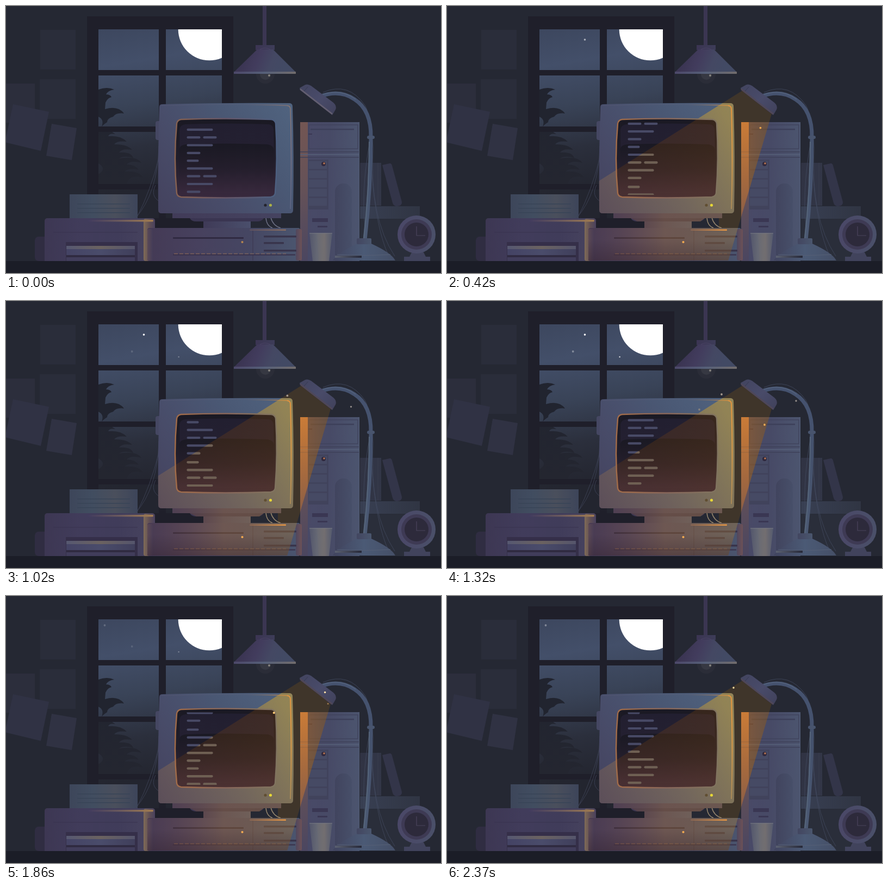
Animation of 800 by 492 pixels, one loop 2.4 s. Source, as an HTML page with a canvas:

```html
<!DOCTYPE html>
<html lang="en">
<head>
<meta charset="utf-8">
<title>Night desk</title>
<style>
html, body { margin: 0; width: 100%; height: 100%; overflow: hidden; background: #252833; }
canvas { display: block; }
</style>
</head>
<body>
<canvas id="stage" width="800" height="492"></canvas>
<script>
const c = document.getElementById('stage').getContext('2d');
const LOOP = 2400;
const INK = '#3a3753';

// Gradients: fade(x0, y0, x1, y1, ...colours) with evenly spread stops
function fade(x0, y0, x1, y1, ...colors) {
  const g = c.createLinearGradient(x0, y0, x1, y1);
  colors.forEach((color, i) => g.addColorStop(i / (colors.length - 1), color));
  return g;
}
const across = (a, b, ...colors) => fade(a, 0, b, 0, ...colors);
const down = (a, b, ...colors) => fade(0, a, 0, b, ...colors);

function box(x0, y0, x1, y1, fill, r = 0) {
  c.fillStyle = fill;
  c.beginPath();
  c.roundRect(x0, y0, x1 - x0, y1 - y0, r);
  c.fill();
}
function shape(d, fill) {
  c.fillStyle = fill;
  c.fill(new Path2D(d));
}
function line(d, color, width = 1) {
  c.strokeStyle = color;
  c.lineWidth = width;
  c.stroke(new Path2D(d));
}
function disc(x, y, r, fill) {
  c.fillStyle = fill;
  c.beginPath();
  c.arc(x, y, r, 0, 7);
  c.fill();
}
function clipped(path, draw, rule = 'nonzero') {
  c.save();
  c.clip(path, rule);
  draw();
  c.restore();
}

const MONITOR = 'M288 181Q400 178 522 179Q527 180 527 185Q530 280 528 376Q528 382 522 382H286Q280 382 280 376Q279 280 282 186Q282 181 288 181Z';
const SCREEN = 'M322 209Q404 206 488 209Q495 210 496 217Q500 282 495 345Q494 351 487 352Q404 355 322 352Q315 351 314 345Q308 282 314 217Q315 210 322 209Z';
const BEAM = new Path2D('M543 156L280 322L260 335V470H517L597 199Z');
const TOWER = new Path2D('M541 214H650V470H541Z');
const CASING = new Path2D(MONITOR + SCREEN);
const STAND = new Path2D('M306 382H506V391H474L466 397H450V409H541V469H260V409H363V397H350L338 391H306Z');

function wall() {
  box(0, 0, 800, 492, '#252833');
  box(63, 44, 128, 117, '#2a2d3a');
  box(62, 135, 128, 208, '#2a2d3a');
  box(0, 143, 53, 215, '#2c2e3c');
  shape('M13 181L79 195L64 267L-2 251Z', '#303244');
  shape('M84 217L130 225L121 284L74 276Z', '#303243');
}

function windowView() {
  box(149, 19, 418, 470, '#1f1f2a');
  const sky = fade(190, 30, 240, 340, '#3c465d', '#434f69', '#394357', '#2b2f3c', '#23252f');
  for (const [x0, x1] of [[170, 281], [294, 397]])
    for (const [y0, y1] of [[43, 118], [128, 222], [232, 328], [338, 391]])
      box(x0, y0, x1, y1, sky);
  const panes = new Path2D('M170 128H281V222H170ZM170 232H281V328H170Z');
  clipped(panes, () => {
    shape('M170 154Q186 148 199 154Q187 156 184 163Q192 163 194 168Q187 169 183 178L182 190Q206 183 217 198Q203 196 197 204Q186 207 186 214Q181 217 176 222Q181 209 170 204Z', '#21242f');
    const tree = down(220, 328, '#222530', '#242630');
    shape('M170 225Q188 226 201 236Q190 234 188 240Q211 238 222 250Q204 248 199 255Q222 254 232 265Q213 262 208 270Q230 268 234 280Q217 275 208 281Q240 276 249 289Q229 284 222 292Q238 292 244 302Q226 298 218 305Q244 303 252 316Q226 310 222 328H170V310Q186 300 170 290Z', tree);
  });
  clipped(new Path2D('M294 43H397V118H294Z'), () => disc(374, 43, 57.3, '#fff'));
}

function ceilingLamp() {
  box(472, 0, 479, 73, '#3b3652');
  disc(477, 126, 17, '#2b2d38');
  disc(477, 126, 10, '#363842');
  disc(484, 128, 2, '#86837f');
  box(459, 72, 494, 81, across(459, 494, '#3b3553', '#3d3c58'));
  shape('M462 80H491L532 121H420Z', fade(440, 90, 510, 118, '#3b3553', '#423c5d', '#444863', '#424a64'));
  line('M467 80Q476 75 486 80', '#4b4365');
  box(419, 121, 533, 125, across(419, 533, '#4c4869', '#566079', '#716c6c'));
}

function shelf() {
  box(651, 392, 745, 470, '#2a2e3a');
  box(651, 289, 690, 368, across(651, 690, '#303343', '#323647'));
  line('M684 289V368', '#383d4d');
  shape('M692 293L706 290Q709 290 710 294L728 361Q729 368 719 369Q713 369 711 363Z', '#333549');
  box(651, 369, 761, 392, across(651, 761, '#383f52', '#303543'));
  box(651, 392, 761, 394, '#292d39');
}

function printer() {
  box(53, 425, 90, 470, '#302d42', 7);
  shape('M117 347H242V391H117Z', across(117, 242, '#3d465a', '#414d60', '#4a4f5c', '#3d455a'));
  for (const y of [364, 372, 380]) box(131, y, 228, y + 1.5, '#384457');
  box(71, 391, 274, 475, across(71, 274, '#3d3753', '#413c5b', '#403c5a', '#48445f'), 5);
  box(253, 392, 274, 470, across(253, 274, '#806b57', '#604f55', '#49415d'), 4);
  box(150, 394, 271, 397.5, across(150, 271, '#413b5e', '#6c5a5d', '#a57e50'), 2);
  line('M87 417H242', '#39334f');
  box(110, 435, 242, 470, '#352f49');
  box(111, 442, 237, 448, across(111, 237, '#565871', '#6b6260', '#55556c'));
  box(111, 448, 237, 459, across(111, 237, '#444364', '#4a4c6b', '#403f5b'));
  box(111, 459, 237, 463, '#302b41');
  box(111, 463, 237, 470, '#413d5b');
}

function tower() {
  c.fillStyle = across(541, 650, '#494967', '#474a66', '#4c556f');
  c.fill(TOWER);
  box(541, 214, 555, 470, down(214, 470, '#735653', '#645158', '#4b4660'));
  c.strokeStyle = '#3f425b';
  c.lineWidth = 1.2;
  c.strokeRect(557, 219, 90, 44);
  box(560, 226, 640, 228.5, '#3d405a');
  box(556, 235, 563, 237, INK);
  for (const y of [268, 273, 278]) box(541, y, 650, y + 1.6, y === 273 ? '#566079' : '#3e4159');
  box(556, 283, 593, 375, '#41435c');
  for (const y of [286, 303, 320, 337, 354]) box(557, y, 590, y + 14, '#464a64');
  disc(584, 291, 4, '#30283c');
  disc(585, 290, 1.8, '#b77552');
  box(605, 327, 636, 470, across(605, 636, '#41445e', '#474f69'), [15, 15, 0, 0]);
  box(563, 391, 592, 398, INK);
  box(573, 405, 591, 408, INK);
  line('M649.5 214V470', '#535e78');
}

function clock() {
  shape('M746 454H768L772 462H780V470H732V462H742Z', '#41435c');
  disc(755, 421, 35, across(720, 790, '#4a4767', '#4a5069'));
  disc(755, 421, 28, '#3e3a54');
  disc(755, 421, 22, '#2d2a3b');
  line('M755 406V423H771', '#4b455d', 1.2);
}

function monitor(lit) {
  line('M281 258Q279 345 238 391M281 280Q266 340 241 389M275 330Q265 350 282 360', '#3f4458', .8);
  line('M478 390Q479 405 490 409M487 390Q491 405 505 409', lit ? '#93846c' : '#6b6e82', 1.5);
  box(275, 212, 286, 247, '#454762', 4);
  box(306, 381, 506, 391, across(306, 506, '#413b58', '#454360'));
  shape('M338 391H474Q470 397 462 397H350Q341 397 338 391Z', '#3a3551');
  box(363, 397, 450, 410, across(363, 450, '#3f3a57', '#4a4f6c'));
  box(260, 409, 541, 470, across(260, 541, '#443a55', '#47415e', '#454662', '#4b566f'), 4);
  box(260, 411, 270, 469, across(260, 270, '#594956', '#443c58'), 3);
  box(533, 411, 544, 469, across(533, 544, '#50475d', '#6d5156'), 3);
  line('M454 411V469', '#3a364f');
  box(307, 426, 437, 429, '#302a41', 1);
  for (const [y, x] of [[423, 534], [435, 511], [449, 534]]) box(474, y, x, y + 3.5, '#38344b', 1);
  line('M307 458.5H532', '#38314a', 2);
  c.setLineDash([7, 3]);
  line('M309 456.5H515', across(309, 515, '#7d5e56', '#746364'), 1.5);
  c.setLineDash([]);

  shape(MONITOR, fade(280, 380, 528, 190, '#44425e', '#484c69', '#4a5874', '#50637f'));
  line('M286 183.5Q400 180 522 182', across(286, 522, '#505470', '#57647d'), 1);
  shape(SCREEN, down(210, 352, '#1a1923', '#201d2a', '#38293d'));
  shape('M330 218Q404 215 483 218Q491 219 492 227L493 300H320L319 228Q320 219 330 218Z', down(217, 265, '#221f30', '#242031'));
  shape('M331 255Q404 252 481 255Q491 257 493 264V345H318V264Q320 256 331 255Z', down(254, 346, '#1a1923', '#241e2c', '#38293d'));
  disc(477, 367, 2.6, '#24242d');
}

// One entry per row of code: widths of its segments
const ROWS = [[48], [25, 25], [48], [25], [22]];
const SPAN = 145.2;
function codeLines(t, color) {
  clipped(new Path2D('M320 214.5H490V348H320Z'), () => {
    const shift = t / LOOP * SPAN;
    for (let i = 0; i < 22; i++) {
      const n = i % 10;
      const y = 227.9 + n * 14.3 + (n === 9 ? 2.2 : 0) + Math.floor(i / 10) * SPAN - shift;
      ROWS[i % 5].forEach((w, k) => box(332.5 + k * 30, y - 2.1, 332.5 + k * 30 + w, y + 2.1, color, 2));
    }
  });
}

function rims(lit) {
  line(SCREEN, across(310, 498, lit ? '#a36c48' : '#886250', lit ? '#87665a' : '#655566', lit ? '#80745f' : '#4c5f80'), 2.4);
  const edge = lit ? '#e4953e' : '#8c7772';
  line('M440 182.5Q490 182 517 183.5', across(440, 517, 'rgba(110,100,110,0)', edge), 1.2);
  line('M517 183.5Q523 184 523 190Q526 290 523 374',
    down(184, 374, edge, lit ? '#d99a49' : '#777384', lit ? '#a98a57' : '#5d6584'), lit ? 2 : 1.5);
  box(448, 411.5, 515, 414, across(448, 515, lit ? '#856454' : '#5b5060', lit ? '#e89743' : '#886d60'), 1);
  disc(434.5, 435, 2.1, lit ? '#f2aa51' : '#b4854f');
  disc(486.5, 367, 2.6, lit ? '#e6d737' : '#aab047');
}

function beam(t) {
  clipped(BEAM, () => {
    clipped(CASING, () => box(260, 150, 545, 470, fade(280, 370, 528, 230, 'rgba(180,125,70,.22)', 'rgba(195,145,60,.34)', 'rgba(218,168,42,.48)')), 'evenodd');
    clipped(new Path2D(SCREEN), () => {
      box(300, 200, 500, 360, across(310, 498, 'rgba(135,72,12,.20)', 'rgba(150,82,8,.24)'));
      codeLines(t, '#6f6053');
    });
    clipped(STAND, () => {
      box(260, 382, 541, 470, across(260, 541, 'rgba(140,70,50,.06)', 'rgba(185,125,55,.34)', 'rgba(185,130,45,.32)'));
      box(260, 430, 541, 470, down(430, 470, 'rgba(45,28,40,0)', 'rgba(45,28,40,.35)'));
    });
    clipped(TOWER, () => {
      box(555, 214, 650, 470, across(555, 600, 'rgba(185,105,15,.44)', 'rgba(150,92,10,.36)'));
      box(541, 214, 555, 470, down(214, 400, 'rgba(235,138,45,.72)', 'rgba(215,120,35,.36)'));
    });
  });
}

function deskLamp(lit) {
  line('M583 159Q630 139 660 183Q672 204 675 262Q668 390 715 461M672 300Q680 410 704 461M670 244Q650 350 663 430', '#424a5f', .8);
  line('M577 167Q613 153 641 172Q672 192 671 242Q671 335 660 431', down(150, 430, '#45526f', '#45526d', '#4b5973'), 7);
  line('M580 164Q616 151 643 172', '#53617b', 1.5);
  line('M668 250Q668 340 658 430', '#556479', 2);
  box(664, 239, 678, 245, '#48546d', 3);
  shape('M601 469Q607 457 645 438H672Q709 455 716 469Z', across(601, 716, '#41445f', '#4b5a75', '#454f67'));
  box(645, 428, 672, 439, across(645, 672, '#424660', '#4a566e'), 2);
  line('M609 458Q655 461 707 458', '#566076');
  box(605, 460, 654, 464, across(605, 654, '#5a6070', '#272939'));
  shape('M540 151L547 147Q553 142 561 147L602 178Q609 184 606 191L600 201L541 155Z', fade(550, 145, 600, 200, '#434561', '#494b69', '#41425c'));
  line('M541 153L600 199', lit ? '#504757' : '#645f70', 2.5);
  line('M555 149L548 157', '#363950');
}

function cup() {
  shape('M558 418H600L594 470H564Z', across(558, 600, '#53566b', '#656874', '#716d70', '#555b6f'));
  line('M558 419H600', '#737480');
  shape('M572 420H587L584 470H575Z', 'rgba(135,128,115,.1)');
}

// Opacity that rises over [a, b] and falls over [d, e]
const ramp = (t, a, b) => Math.min(1, Math.max(0, (t - a) / (b - a)));
const glow = (t, [a, b, d, e]) => ramp(t, a, b) * (1 - ramp(t, d, e));

const STARS = [
  { x: 253.5, y: 62, r: 1.8, life: [180, 600, 1340, 1560] },
  { x: 231.7, y: 93, r: 1.9, dim: .35, life: [850, 1250, 1650, 1980] },
  { x: 317.6, y: 103, r: 1.2, dim: .8, life: [900, 1200, 1680, 1980] },
  { x: 181.5, y: 54, r: 1.9, dim: .35, life: [1680, 2000, 2399, 2400] },
];

// Path points are [time, x, y]
const DUST = [
  { life: [120, 240, 300, 420], r: 1.9, color: '#a79b83', path: [[120, 480, 183], [240, 472, 180], [420, 460, 176]] },
  { life: [90, 200, 780, 960], r: 1.9, color: '#eda64c', path: [[90, 563, 258], [240, 570, 243], [690, 586, 197], [960, 588, 180]] },
  { life: [500, 690, 1380, 1530], r: 1.9, color: '#a3978d', path: [[500, 538, 181], [690, 531, 177], [1320, 505, 172], [1530, 492, 174]] },
  { life: [570, 690, 2376, 2399], r: 1.7, color: '#968f8c', warm: 1750, path: [[570, 618, 211], [690, 621, 205], [1080, 637, 193], [1320, 642, 184], [1620, 608, 178], [2070, 568, 177], [2370, 527, 169], [2400, 522, 168]] },
  { life: [1160, 1320, 1390, 1560], r: 1.9, color: '#83807e', path: [[1160, 471, 197], [1320, 464, 200], [1560, 455, 204]] },
  { life: [1180, 1320, 1680, 1800], r: 1.9, color: '#f2ad55', path: [[1180, 593, 243], [1320, 584, 228], [1620, 540, 193], [1800, 518, 180]] },
  { life: [1460, 1590, 2090, 2190], r: 2, color: '#ffcd77', path: [[1460, 536, 222], [1620, 520, 219], [2070, 469, 212], [2190, 455, 210]] },
  { life: [1500, 1620, 2040, 2170], r: 1.5, color: '#9c7950', path: [[1500, 621, 212], [1620, 614, 206], [2070, 573, 192], [2170, 564, 189]] },
];

function along(path, t) {
  let i = 0;
  while (i < path.length - 2 && t > path[i + 1][0]) i++;
  const [a, x0, y0] = path[i], [b, x1, y1] = path[i + 1];
  const k = ramp(t, a, b);
  return [x0 + (x1 - x0) * k, y0 + (y1 - y0) * k];
}

function specks(t) {
  for (const s of STARS) {
    c.globalAlpha = glow(t, s.life) * (s.dim || 1);
    disc(s.x, s.y, s.r, '#fff');
  }
  for (const d of DUST) {
    c.globalAlpha = glow(t, d.life);
    if (c.globalAlpha) disc(...along(d.path, t), d.r, d.warm && t > d.warm ? '#ffe2a8' : d.color);
  }
  c.globalAlpha = 1;
}

const lampOn = t => t >= 60 && !(t >= 1200 && t < 1230);

function render(t) {
  const lit = lampOn(t);
  wall();
  windowView();
  ceilingLamp();
  shelf();
  if (lit) clipped(BEAM, () => box(500, 150, 600, 470, 'rgba(185,112,0,.18)'));
  printer();
  tower();
  monitor(lit);
  codeLines(t, '#484a66');
  if (lit) beam(t);
  rims(lit);
  clock();
  cup();
  deskLamp(lit);
  box(0, 470, 800, 492, '#1b1d27');
  specks(t);
}

const start = performance.now();
function tick() {
  const t = (performance.now() - start) % LOOP;
  render(Math.floor(t / 30) * 30);
  requestAnimationFrame(tick);
}
tick();
</script>
</body>
</html>
```
